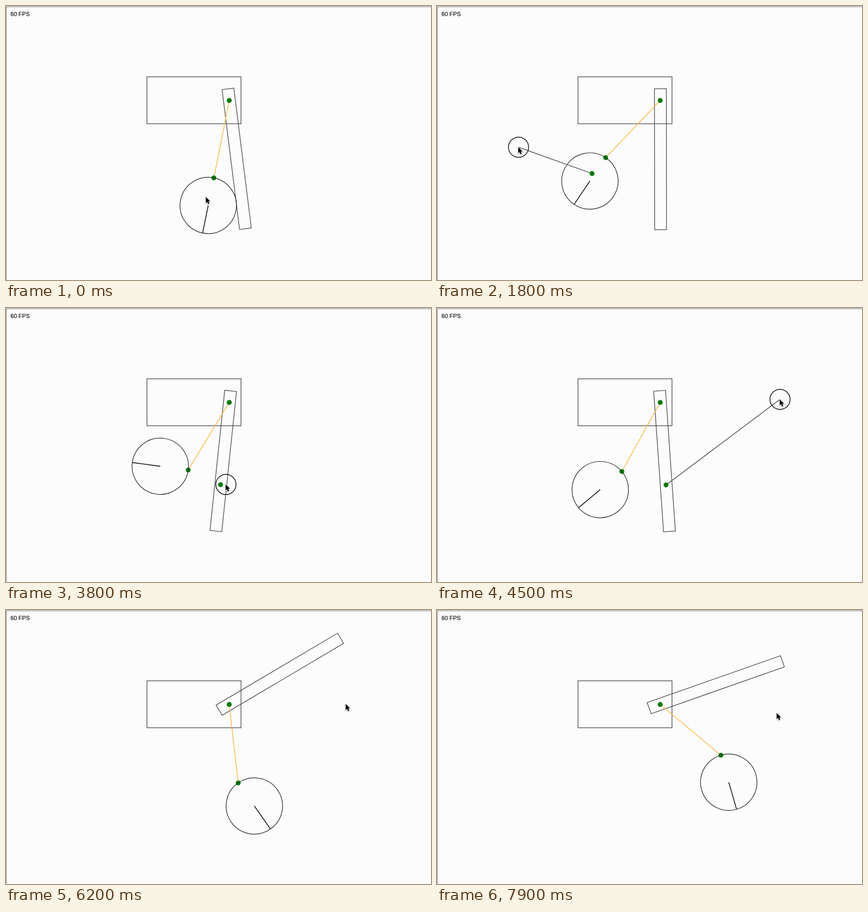
Recreate the animation shown at these times as an HTML page. Size 800 by 517 pixels, loop 8000 ms.

```html
<!DOCTYPE html>
<html lang="en">
<head>
<meta charset="utf-8">
<title>Pendulum and disc</title>
<style>
  html, body { margin: 0; width: 100%; height: 100%; overflow: hidden; background: #fcfcfc; }
  svg { display: block; width: 800px; height: 517px; }
  text { font: 10.8px "Liberation Sans", Arial, sans-serif; fill: #111; stroke: #111; stroke-width: .2; }
  .body { fill: none; stroke: #484848; stroke-width: 1.25; }
  .disc { fill: none; stroke: #282828; stroke-width: 1.2; }
  .axis { stroke: #1c1c1c; stroke-width: 1.6; }
  .cord { stroke: #fbb648; stroke-width: 1.4; }
  .pull { stroke: #5c5c5c; stroke-width: 1.5; }
  .ring { fill: none; stroke: #111; stroke-width: 1.4; }
  .dot { fill: #087a08; }
  .frame { fill: none; stroke: #7c7c7c; }
  .arrow { stroke: #fff; stroke-width: 1.4; paint-order: stroke; filter: drop-shadow(0 1px 1px #0005); }
</style>
</head>
<body>
<svg viewBox="0 0 800 517">
  <path class="frame" d="M.5 517V1.5H800"/>
  <text id="fps" x="8.6" y="18.6">60 FPS</text>
  <rect class="body" x="265.4" y="133.6" width="177" height="88.6"/>
  <rect class="body" id="bar" x="-10.8" y="-22" width="22.3" height="266"/>
  <line class="cord" id="cord"/>
  <circle class="dot" id="rim" r="4.6"/>
  <g id="disc">
    <circle class="disc" r="53.1"/>
    <line class="axis" y2="53"/>
  </g>
  <circle class="dot" id="pivot" r="4.7"/>
  <g id="grab">
    <line class="pull" id="pull"/>
    <circle class="dot" id="hold" r="4.6"/>
    <circle class="ring" id="ring" r="19"/>
  </g>
  <g id="cursor">
    <path class="arrow" d="M-.6-.2V11.3L2 8.9 3.8 13.2 6 12.3 4.2 8.1H7.7Z"/>
  </g>
</svg>
<script>
const LOOP = 8000, STEP = 100;
const PIVOT = { x: 420.2, y: 178.2 }, CORD = 149, RADIUS = 53.1;
const GRAB_RADIUS = 19;

// Key poses: ms, then degrees from straight down (positive to the right) of bar, cord and disc
const poses = [
  [0, 7.1, -11.2, -11.5],
  [1000, 3.8, -29.2, -2.2],
  [2600, -3.4, -50.1, -73.5],
  [3800, -6, -31.2, -97.6],
  [4500, 4, -29, -50],
  [5200, 47.7, -26.2, 10],
  [6200, 120.7, 6.5, 34.9],
  [7200, 130, 40, 41],
  [7900, 109.4, 50, 16.2]
];
const BAR = 1, TETHER = 2, DISC = 3;

// Pointer glides, each easing from wherever the last one ended
const home = { x: 376.8, y: 360.5 };
const glides = [
  { from: 200, to: 900, x: 153.5, y: 266.5 },
  { from: 2700, to: 3650, x: 414, y: 333 },
  { from: 3800, to: 4650, x: 666.5, y: 158 },
  { from: 5200, to: 5400, x: 640, y: 177.5 },
  { from: 6500, to: 7000, x: 640, y: 194.5 }
];

const el = {};
document.querySelectorAll('[id]').forEach(e => el[e.id] = e);

const within = (t, from, to) => t >= from && t < to;
const rate = (part, i) =>
  (poses[i + 1][part] - poses[i][part]) / (poses[i + 1][0] - poses[i][0]);

// Angular speed at a pose, from the parabola through its neighbours
function speed(part, i) {
  if (i === 0) return rate(part, 0);
  if (i === poses.length - 1) return rate(part, i - 1);
  const before = poses[i][0] - poses[i - 1][0], after = poses[i + 1][0] - poses[i][0];
  return (rate(part, i - 1) * after + rate(part, i) * before) / (before + after);
}

// Cubic Hermite through the poses, in radians
function swing(part, t) {
  let i = 0;
  while (i < poses.length - 2 && t >= poses[i + 1][0]) i++;
  const a = poses[i], b = poses[i + 1], h = b[0] - a[0];
  const u = (t - a[0]) / h, v = 1 - u;
  const deg = a[part] * v * v * (1 + 2 * u) + b[part] * u * u * (1 + 2 * v)
    + h * u * v * (speed(part, i) * v - speed(part, i + 1) * u);
  return deg * Math.PI / 180;
}

function mouseAt(t) {
  return glides.reduce((p, g) => {
    const u = Math.min(1, Math.max(0, (t - g.from) / (g.to - g.from)));
    const e = u * u * (3 - 2 * u);
    return { x: p.x + (g.x - p.x) * e, y: p.y + (g.y - p.y) * e };
  }, home);
}

// Point at `along` down an arm leaning at `angle`, `side` to its right
const reach = (p, angle, along, side = 0) => ({
  x: p.x + along * Math.sin(angle) + side * Math.cos(angle),
  y: p.y + along * Math.cos(angle) - side * Math.sin(angle)
});

function set(node, attrs) {
  for (const k in attrs) node.setAttribute(k, attrs[k]);
}
const place = (node, p, angle = 0) =>
  set(node, { transform: `translate(${p.x} ${p.y}) rotate(${-angle * 180 / Math.PI})` });
const join = (node, a, b) => set(node, { x1: a.x, y1: a.y, x2: b.x, y2: b.y });

function draw(t) {
  const bar = swing(BAR, t), turn = swing(DISC, t);
  const rim = reach(PIVOT, swing(TETHER, t), CORD);
  const centre = reach(rim, turn, RADIUS);
  const mouse = mouseAt(t);

  place(el.pivot, PIVOT);
  place(el.bar, PIVOT, bar);
  place(el.rim, rim);
  place(el.disc, centre, turn);
  place(el.cursor, mouse);
  join(el.cord, PIVOT, rim);

  const onDisc = within(t, 200, 2300), onBar = within(t, 3700, 5100);
  const hold = onDisc ? reach(centre, turn, -13.9, -4.5) : reach(PIVOT, bar, 156);
  el.grab.style.display = onDisc || onBar ? '' : 'none';
  place(el.hold, hold);
  place(el.ring, mouse);
  join(el.pull, mouse, hold);
  const stretch = Math.hypot(hold.x - mouse.x, hold.y - mouse.y);
  set(el.pull, { opacity: stretch > GRAB_RADIUS ? 1 : 0 });

  // The frame rate dips briefly now and then
  el.fps.textContent = (within(t % 2800, 400, 600) ? 59 : 60) + ' FPS';
}

const start = performance.now();
function tick() {
  const t = (performance.now() - start) % LOOP;
  draw(Math.floor(t / STEP) * STEP);
  requestAnimationFrame(tick);
}
tick();
</script>
</body>
</html>
```
